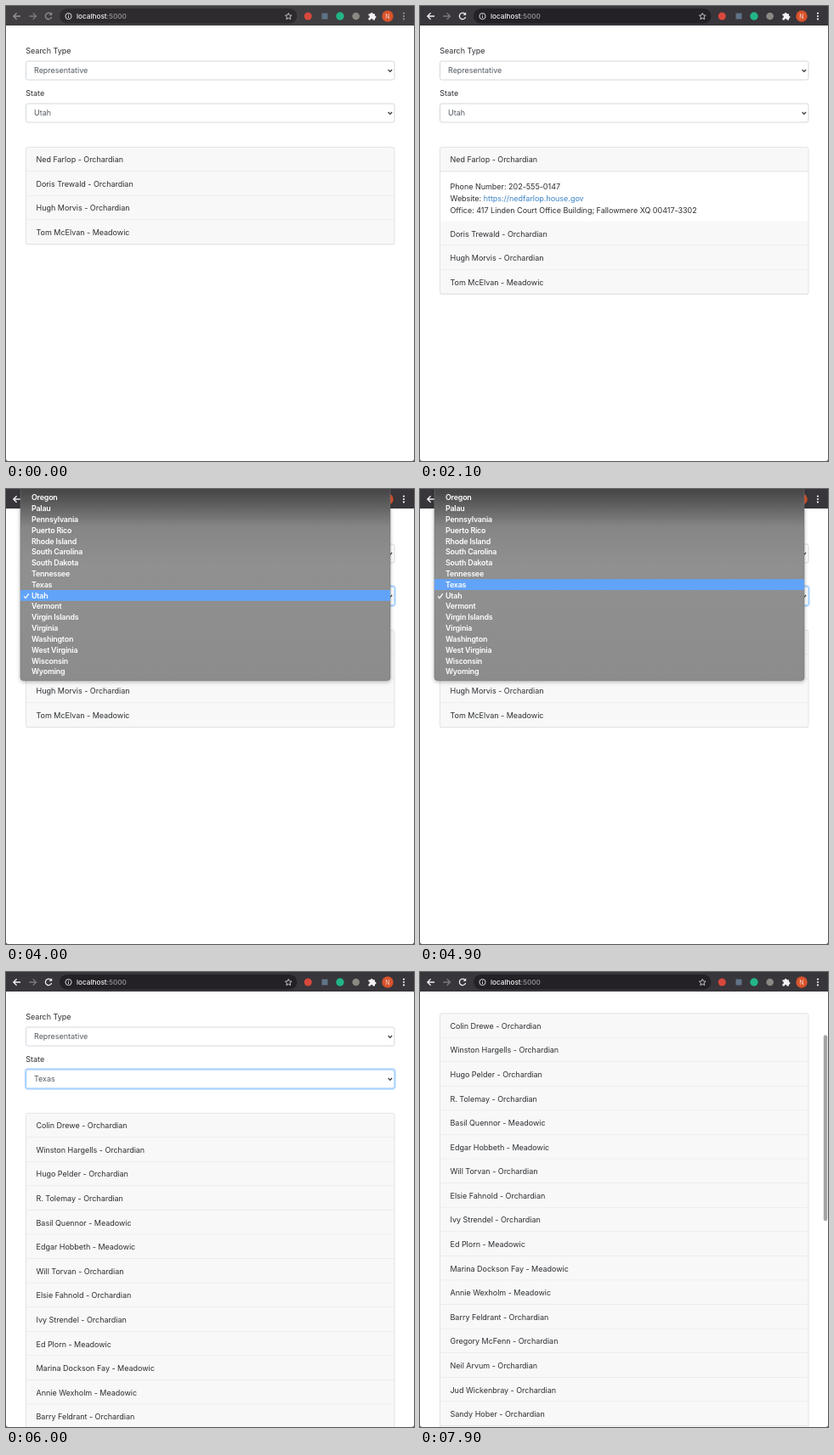
Animation of 480x536 px, one loop 8000 ms. Source, as an HTML page:

```html
<!DOCTYPE html>
<html lang="en">
<head>
<meta charset="utf-8">
<title>Member search</title>
<style>
  html, body { margin: 0; width: 100%; height: 100%; overflow: hidden; background: #fff; }
  svg { display: block; width: 100vw; height: 100vh; }
  text { font: 9px Inter, "Open Sans", sans-serif; letter-spacing: -.02px; fill: #2b2e32; white-space: pre; }
  .field { fill: #53595f; }
  .url { font-size: 8.2px; font-weight: 500; letter-spacing: 0; }
  .menu text { font-size: 8.9px; font-weight: 600; letter-spacing: -.2px; fill: #fff; }
  .line { fill: none; stroke: #e3e3e3; }
  .icon { fill: none; stroke-width: 1.3; }
</style>
</head>
<body>
<svg id="stage" viewBox="0 0 480 536"></svg>
<script>
const LOOP = 8000;
const ROW = 28.58, LIST_TOP = 166.3, BODY = 65.3;
const LEFT = 23.5, WIDTH = 433.5;

const A = 'Orchardian', B = 'Meadowic';
const utah = [['Ned Farlop', A], ['Doris Trewald', A], ['Hugh Morvis', A], ['Tom McElvan', B]];
const texas = [
  ['Colin Drewe', A], ['Winston Hargells', A], ['Hugo Pelder', A], ['R. Tolemay', A],
  ['Basil Quennor', B], ['Edgar Hobbeth', B], ['Will Torvan', A], ['Elsie Fahnold', A],
  ['Ivy Strendel', A], ['Ed Plorn', B], ['Marina Dockson Fay', B], ['Annie Wexholm', B],
  ['Barry Feldrant', A], ['Gregory McFenn', A], ['Neil Arvum', A], ['Jud Wickenbray', A],
  ['Sandy Hober', A]
];
const states = ['Oklahoma', 'Oregon', 'Palau', 'Pennsylvania', 'Puerto Rico', 'Rhode Island',
  'South Carolina', 'South Dakota', 'Tennessee', 'Texas', 'Utah', 'Vermont', 'Virgin Islands',
  'Virginia', 'Washington', 'West Virginia', 'Wisconsin', 'Wyoming'];

const text = (x, y, s, attrs = '') => `<text x="${x}" y="${y}" ${attrs}>${s}</text>`;
const dot = (x, y, r, fill) => `<circle cx="${x}" cy="${y}" r="${r}" fill="${fill}"/>`;
const itemY = i => -2.8 + 12.82 * i;

function row([name, party], i) {
  const y = LIST_TOP + i * ROW;
  return `<rect x="${LEFT}" y="${y}" width="${WIDTH}" height="${ROW}" fill="#f8f8f8"/>
    <path class="line" d="M${LEFT} ${y + ROW}h${WIDTH}"/>
    ${text(35.5, y + 18, `${name} - ${party}`)}`;
}

function select(y, value, id) {
  return `<rect id="${id}Ring" x="22.6" y="${y - .9}" width="435.3" height="23.8" rx="3.2" fill="none"
      stroke="#c6e1ff" stroke-width="2" visibility="hidden"/>
    <rect id="${id}Box" x="${LEFT}" y="${y}" width="${WIDTH}" height="22" rx="2.3" fill="#fff" stroke="#d3d8dd"/>
    ${text(33, y + 14.2, value, `class="field" id="${id}Value"`)}
    <path d="M449.7 ${y + 10}l2.2 2.4 2.2-2.4" fill="none" stroke="#343a40" stroke-width="1.3"/>`;
}

const card = (id, h) =>
  `<rect id="${id}" class="line" x="${LEFT}" y="${LIST_TOP}" width="${WIDTH}" height="${h}" rx="2.3"/>`;

const page = `
  ${text(23.3, 56.3, 'Search Type')}${select(65, 'Representative', 'type')}
  ${text(23.3, 106.3, 'State')}${select(115, 'Utah', 'state')}
  <g id="utah">
    <g clip-path="url(#bodyClip)">
      ${text(35.5, 216.3, 'Phone Number: 202-555-0147')}
      ${text(35.5, 230.3, 'Website: <tspan fill="#3d84c6">https://nedfarlop.house.gov</tspan>')}
      ${text(35.5, 244.3, 'Office: 417 Linden Court Office Building; Fallowmere XQ 00417-3302')}
    </g>
    ${row(utah[0], 0)}
    <g id="rest">${utah.slice(1).map((m, i) => row(m, i + 1)).join('')}</g>
    ${card('utahCard', utah.length * ROW)}
  </g>
  <g id="texas">
    ${texas.map(row).join('')}
    <rect x="${LEFT}" y="${LIST_TOP + texas.length * ROW + .5}" width="${WIDTH}" height="200" fill="#f8f8f8"/>
    ${card('texasCard', 1029)}
  </g>`;

const toolbar = `
  <rect id="bar" width="480" height="23"/>
  <rect id="pill" x="63" y="3" width="279.5" height="17.6" rx="8.8"/>
  <g id="controls" class="icon">
    <path d="M17 12H9M12.6 8.2L8.8 12l3.8 3.8"/>
    <path d="M52.8 9.3A3.7 3.7 0 1 0 53.6 13"/>
    <path d="M54.2 7.2v3.6h-3.6z" stroke="none" fill="currentColor"/>
    <g stroke="none">${[8.6, 12, 15.4].map(y => dot(468, y, 1.1, 'currentColor')).join('')}</g>
  </g>
  <path class="icon" stroke="#7b797e" d="M27.3 12h8M31.7 8.2l3.8 3.8-3.8 3.8"/>
  <circle class="icon" cx="73.5" cy="12" r="3.6" stroke="#d8d7da" style="stroke-width:1"/>
  <path class="icon" stroke="#d8d7da" style="stroke-width:1" d="M73.5 11.6v2.4M73.5 9.7v1"/>
  ${text(83, 14.8, '<tspan fill="#f2f1f3">localhost</tspan><tspan fill="#98969b">:5000</tspan>', 'class="url"')}
  <path class="icon" stroke="#d5d4d7" style="stroke-width:.9"
    d="M332.3 8.3l1.1 2.5 2.7.3-2 1.8.6 2.7-2.4-1.4-2.4 1.4.6-2.7-2-1.8 2.7-.3z"/>
  ${dot(355.3, 12, 4.5, '#d8483c')}
  <rect x="371.5" y="8.5" width="7" height="7" fill="#5f7486"/>
  ${dot(393, 12, 4.7, '#22b587')}
  ${dot(411.7, 12, 4.3, '#8c8983')}
  <path fill="#f2f1f3" d="M426.5 9.2h2.2a1.5 1.5 0 0 1 3 0h2.3v2.3a1.5 1.5 0 0 1 0 3v2h-2.4a1.4 1.4 0 0 0-2.8 0h-2.3v-2.4a1.4 1.4 0 0 0 0-2.8z"/>
  ${dot(449, 12, 6.7, '#d9532c')}
  ${text(449, 14.6, 'N', 'text-anchor="middle" style="font-size:7px;fill:#f6d9cf"')}`;

const menu = `
  <g id="menu" class="menu">
    <rect x="17" y="-10" width="435" height="235.5" rx="3.5" fill="url(#glass)" stroke="#6f6f6f" stroke-width=".6" filter="url(#shade)"/>
    <rect id="pick" x="17" width="435" height="12.8" fill="#62a3fa"/>
    ${states.map((s, i) => text(30, itemY(i) + 3.2, s)).join('')}
    <path d="M21.2 126.3l1.9 2.2 3.6-5.2" fill="none" stroke="#fff" stroke-width="1.3"/>
  </g>`;

document.getElementById('stage').innerHTML = `
  <defs>
    <clipPath id="bodyClip"><rect id="bodyBox" x="0" y="${LIST_TOP + ROW}" width="480" height="0"/></clipPath>
    <linearGradient id="glass" gradientUnits="userSpaceOnUse" x1="0" y1="0" x2="0" y2="225">
      <stop offset="0" stop-color="#454446"/><stop offset=".07" stop-color="#5a5a5b"/>
      <stop offset=".2" stop-color="#868686"/><stop offset=".4" stop-color="#909090"/>
      <stop offset="1" stop-color="#8c8c8c"/>
    </linearGradient>
    <filter id="shade" x="-5%" y="-5%" width="110%" height="115%">
      <feDropShadow dx="0" dy="1.5" stdDeviation="2" flood-opacity=".3"/>
    </filter>
  </defs>
  <rect width="480" height="536" fill="#fff"/>
  <g id="page">${page}</g>
  <rect id="thumb" x="474.8" width="4.4" height="219" rx="2.2" fill="#8e8e8e"/>
  ${toolbar}${menu}
  <path d="M0 533.5V536H2.5Q0 536 0 533.5M480 533.5V536H477.5Q480 536 480 533.5" fill="#333"/>`;

const $ = id => document.getElementById(id);
const set = (id, attrs) => { for (const k in attrs) $(id).setAttribute(k, attrs[k]); };
const show = (id, on) => set(id, { visibility: on ? 'visible' : 'hidden' });
const ramp = (t, from, to) => Math.min(1, Math.max(0, (t - from) / (to - from)));
const glide = p => 1 - (1 - p) ** 1.47;

// CSS "ease": cubic-bezier(.25, .1, .25, 1)
function ease(p) {
  const bez = (s, a, b) => 3 * (1 - s) ** 2 * s * a + 3 * (1 - s) * s * s * b + s ** 3;
  let lo = 0, hi = 1;
  for (let i = 0; i < 20; i++) {
    const mid = (lo + hi) / 2;
    if (bez(mid, .25, .25) < p) lo = mid; else hi = mid;
  }
  return bez(hi, .1, 1);
}

function render(t) {
  const active = t >= 900;
  set('bar', { fill: active ? '#38353b' : '#403e41' });
  set('pill', { fill: active ? '#232125' : '#2d2b2e' });
  const ink = active ? '#f2f1f3' : '#949296';
  set('controls', { stroke: ink, color: ink });

  const open = BODY * (ease(ramp(t, 1884, 2234)) - ease(ramp(t, 3000, 3350)));
  set('bodyBox', { height: open });
  set('rest', { transform: `translate(0 ${open})` });
  set('utahCard', { height: utah.length * ROW + open });

  const focused = t >= 4000;
  show('stateRing', focused);
  set('stateBox', { stroke: focused ? '#8ec4ff' : '#d3d8dd' });
  $('stateValue').textContent = t >= 5700 ? 'Texas' : 'Utah';
  show('utah', t < 5800);
  show('texas', t >= 5800);

  show('menu', t >= 4000 && t < 5700);
  set('menu', { opacity: 1 - ramp(t, 5460, 5700) });
  set('pick', { y: itemY(states.indexOf(t < 4800 ? 'Utah' : 'Texas')) - 6.4 });

  const scroll = 117.5 * glide(ramp(t, 6700, 7450));
  set('page', { transform: `translate(0 ${-scroll})` });
  set('thumb', { y: 24 + scroll * .427, opacity: ramp(t, 6680, 6760) - ramp(t, 7850, 8100) });
}

function tick() {
  render(performance.now() % LOOP);
  requestAnimationFrame(tick);
}
tick();
</script>
</body>
</html>
```
